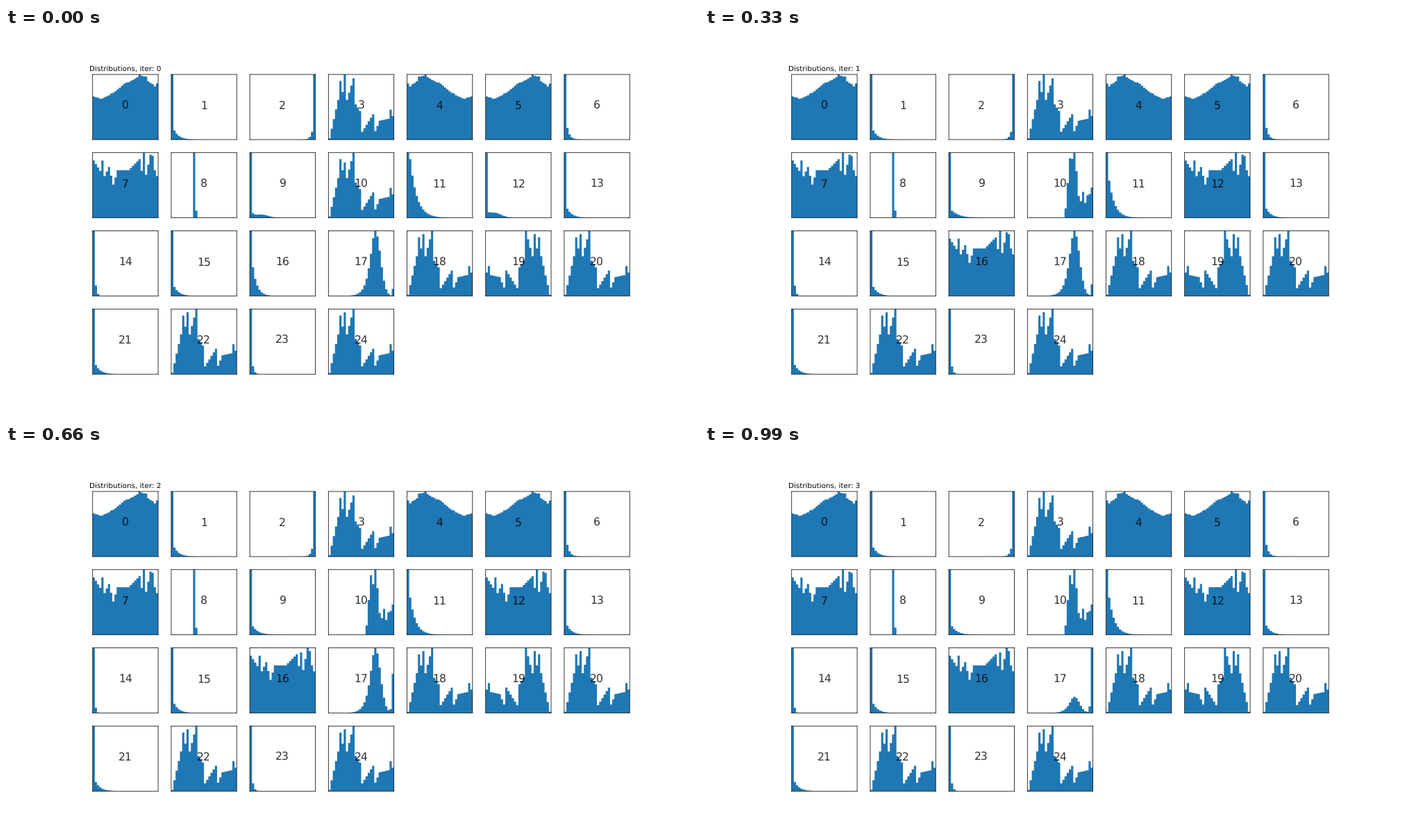
Animation, 998 px wide and 561 px high, one loop 1320 ms. Source, as a matplotlib script:

```python
import numpy as np
import matplotlib.pyplot as plt
from matplotlib.animation import FuncAnimation

BINS = 30
ROWS, COLS, COUNT = 4, 7, 25
STEPS, INTERVAL = 4, 330
x = np.arange(BINS)
rng = np.random.default_rng(3)


def norm(h):
    return h / h.max()


def keys(*points):
    """Heights on straight lines between (bin, height) points."""
    return np.interp(x, *zip(*points))


def gauss(center, sigma):
    return np.exp(-((x - center) / sigma) ** 2 / 2)


def tail(second, ratio):
    """A full first bin, then a geometric decay."""
    h = second * ratio ** np.maximum(x - 1.0, 0)
    h[0] = 1
    return h


def lump(mid, right):
    """Two-peaked lump and a low plateau; the peak heights vary."""
    return keys((0, .02), (4, .61), (5, .9), (6, .73), (7, mid), (8, .61),
                (11, right), (12, .54), (14, .44), (15, .12), (20, .39),
                (21, .13), (23, .29), (27, .32), (28, .46), (29, .36))


def ragged(left, right):
    """Uneven plateau with two peaks near its right end."""
    return keys((0, .88), (3, .72), (4, .88), (5, .64), (7, .78), (9, .51),
                (11, .73), (16, .73), (21, .9), (22, .72), (23, left),
                (24, .66), (26, right), (27, .95), (28, .73), (29, .64))


def squeeze(h, start):
    """Rebin the whole histogram into the bins from start on."""
    total = np.concatenate([[0], np.cumsum(h)])
    edges = (np.arange(BINS + 1) - start) * BINS / (BINS - start)
    return norm(np.diff(np.interp(edges, np.arange(BINS + 1), total)))


def skew(spike):
    """Bump with a long left side, plus a spike in the last bin."""
    bump = np.where(x < 21, 1 / np.cosh((x - 21) / 2), gauss(21, 2.35))
    return norm(bump * (x < 28) + spike * tail(.1, .1)[::-1])


hill = keys((0, .675), (3, .63), (6, .67), (10, .75), (14, .86), (18, .92),
            (21, 1), (24, .97), (25, .9), (28, .83), (29, .865))
hill = norm(hill + rng.uniform(-.008, .008, BINS))
soft = tail(.14, .65)
twin = lump(.95, 1)
flat = ragged(1, .97)

# Each panel lists its states; the last one stays
panels = {i: [soft] for i in (1, 13, 15, 21)}
panels |= {i: [twin] for i in (18, 20, 22, 24)}
panels |= {
    0: [hill],
    2: [tail(.12, .35)[::-1]],
    3: [lump(1, .94)],
    4: [hill[::-1]],
    5: [hill],
    6: [tail(.18, .45)],
    7: [flat],
    8: [np.roll(tail(.11, 0), 10)],
    9: [norm(tail(.05, .4) + .05 * gauss(5, 3)), tail(.11, .75), tail(.13, .68)],
    10: [lump(.85, 1), squeeze(twin, 17), squeeze(lump(.7, 1), 17)],
    11: [tail(.9, .72), tail(.57, .68)],
    12: [norm(tail(.03, .4) + .08 * gauss(3.5, 3.2)), flat],
    14: [tail(.16, .2), tail(.16, .2), tail(.08, .1)],
    16: [tail(.44, .6), ragged(1, .98), ragged(.93, 1)],
    17: [skew(s) for s in (.11, .18, .6, 4)],
    19: [twin[::-1]],
    23: [tail(.12, .25)],
}

plt.rcParams.update({"font.family": "DejaVu Sans", "text.hinting": "none",
                     "axes.linewidth": .9})
fig = plt.figure(figsize=(16, 9), dpi=62.375, facecolor="white")
hists = []
for i in range(COUNT):
    ax = fig.add_subplot(ROWS, COLS, i + 1)
    ax.set(xlim=(0, BINS), ylim=(0, 1), xticks=[], yticks=[])
    # Unsnapped edges keep all bars the same width
    hists.append(ax.stairs(panels[i][0], fill=True, color="tab:blue",
                           snap=False))
    for spine in ax.spines.values():
        spine.set_snap(False)
    ax.text(.5, .52, str(i), transform=ax.transAxes, fontsize=18,
            ha="center", va="center", color="black", alpha=.8)
title = fig.axes[0].set_title("", fontsize=12)


def update(step):
    title.set_text(f"Distributions, iter: {step}")
    for i, hist in enumerate(hists):
        states = panels[i]
        hist.set_data(states[min(step, len(states) - 1)])
    return []


anim = FuncAnimation(fig, update, frames=STEPS, interval=INTERVAL,
                     repeat=True, repeat_delay=0, blit=False)
plt.show()
```
